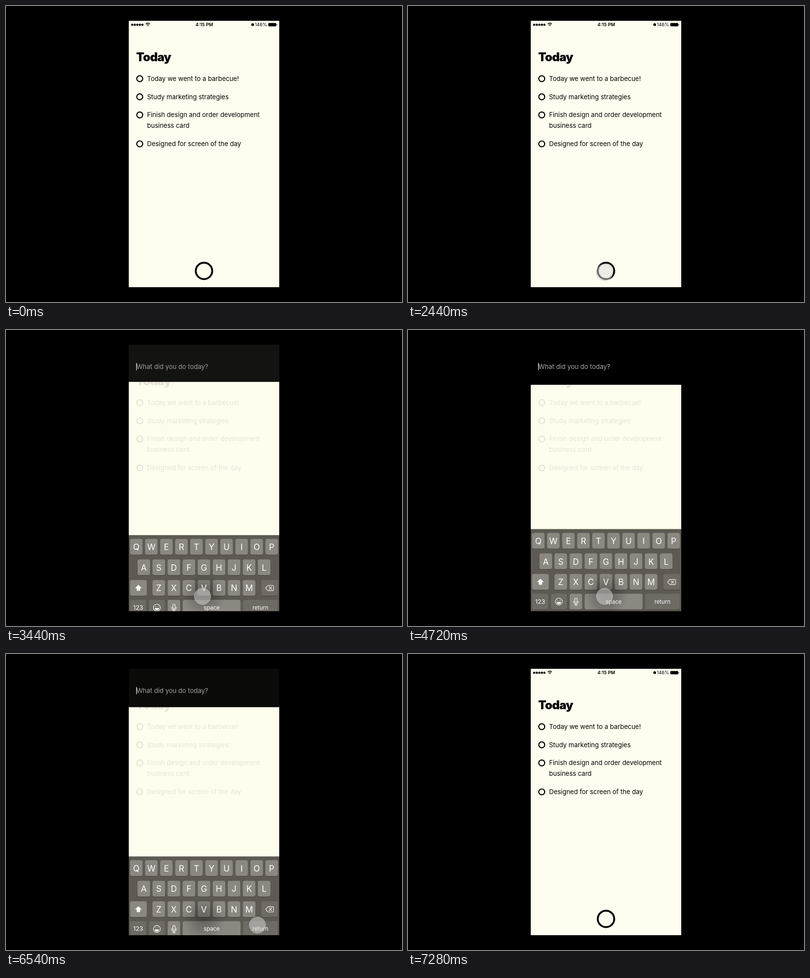
Animation of 800x600 px, one loop 8.54 s. Source, as an HTML page:

```html
<!DOCTYPE html>
<html lang="en">
<head>
<meta charset="utf-8">
<title>Daily journal</title>
<style>
  /* --open: 0 = list, 1 = entry screen; --press: button held down */
  @property --open { syntax: "<number>"; inherits: true; initial-value: 0; }
  @property --press { syntax: "<number>"; inherits: true; initial-value: 0; }

  html, body { margin: 0; width: 100%; height: 100%; overflow: hidden; background: #000; }
  svg { display: block; width: 100vw; height: 100vh; animation: open 8540ms infinite, press 8540ms infinite; }
  text { font-family: Inter, Roboto, sans-serif; font-size: 13px; }

  .title { font-size: 24px; font-weight: 900; letter-spacing: -.8px; }
  .status { font-size: 9.3px; }
  .bold { font-weight: 600; }
  .bullet { fill: none; stroke: #000; stroke-width: 2.2px; }

  .ring {
    --width: calc(3.8px * (1 - var(--open)));
    cx: 400px;
    cy: calc(1px * (537 - 257 * var(--open)));
    r: calc(1px * ((18.5 + 3.5 * var(--press)) * (1 - var(--open)) + 331 * var(--open)) - var(--width) / 2);
    fill: #fffdef;
    fill-opacity: .9;
    stroke: #000;
    stroke-width: var(--width);
  }
  .header { height: calc(1px * (2.5 + 78.5 * var(--open))); opacity: var(--open); }
  .prompt { fill: #a9a9a9; opacity: var(--open); }
  .caret { fill: #fff; opacity: var(--open); }

  .keyboard { transform: translateY(calc(166.5px * (1 - var(--open)))); }
  .key { fill: #8b8882; }
  .key.dark { fill: #6e6a64; }
  .edge { fill: #45423c; }
  .shade { cy: calc(1px * (537 - 166.5 * (1 - var(--open)))); opacity: var(--open); }
  .label { fill: #fff; text-anchor: middle; font-size: 17px; }
  .label.small { font-size: 11.3px; }
  .label.digits { font-size: 12.3px; }
  .line { fill: none; stroke: #fff; stroke-width: 1.1px; stroke-linecap: round; stroke-linejoin: round; }

  .touch {
    fill: rgba(218, 218, 218, .5);
    stroke: rgba(185, 185, 183, .7);
    stroke-width: 1px;
    animation: touch 8540ms infinite;
  }

  @keyframes open {
    0%, 37.471% { --open: 0; }
    41.686%, 76.347% { --open: 1; }
    80.562%, 100% { --open: 0; }
  }
  @keyframes press {
    0%, 28.571% { --press: 0; }
    32.787%, 50% { --press: 1; }
    50.01%, 100% { --press: 0; }
  }
  @keyframes touch {
    0%, 14.988% { transform: translate(570px, 523px); }
    19.672%, 55.269% { transform: translate(397px, 540px); }
    63.7%, 83.372% { transform: translate(508px, 549.5px); }
    87.588%, 100% { transform: translate(596px, 254px); }
  }
</style>
</head>
<body>
<svg viewBox="0 0 800 600">
  <defs>
    <clipPath id="screen"><rect x="248" y="30" width="304" height="540"/></clipPath>
    <radialGradient id="shadow">
      <stop offset="0" stop-opacity=".28"/>
      <stop offset=".4" stop-opacity=".2"/>
      <stop offset="1" stop-opacity="0"/>
    </radialGradient>
  </defs>
  <rect width="800" height="600"/>
  <g clip-path="url(#screen)">
    <rect x="248" y="30" width="304" height="540" fill="#fffdef"/>

    <g id="signal"></g>
    <g fill="none" stroke="#000" stroke-width="1.3">
      <path d="M282.3 36.2a6 6 0 0 1 8.4 0M283.9 38.2a3.7 3.7 0 0 1 5.2 0"/>
    </g>
    <path d="M285 39.5a2.1 2.1 0 0 1 3 0l-1.5 1.6z"/>
    <text class="status bold" x="400.5" y="41.2" text-anchor="middle">4:15 PM</text>
    <circle cx="498.3" cy="37.8" r="2.8"/>
    <text class="status" x="527.5" y="41.2" text-anchor="end">146%</text>
    <rect x="530" y="34.4" width="15.8" height="6.8" rx="1.3"/>
    <rect x="546.4" y="36.4" width="1.2" height="2.8" rx=".6"/>

    <text class="title" x="263" y="112.3">Today</text>
    <g id="list"></g>

    <circle class="ring"/>
    <rect class="header" x="248" y="30" width="304"/>
    <text class="prompt" x="263.5" y="78.6">What did you do today?</text>
    <rect class="caret" x="263" y="67" width="1.2" height="14.5"/>

    <g class="keyboard">
      <rect x="248" y="403.5" width="304" height="168" fill="#5e5a53"/>
      <g id="keys"></g>
      <circle class="shade" cx="400" r="44" fill="url(#shadow)"/>
      <g id="labels"></g>
      <path d="M267.5 504.3l7 6.8h-3.6v5.2h-6.8v-5.2h-3.6z" fill="#fff"/>
      <path class="line" d="M524.3 510.8l5-5.3h9.6q1.6 0 1.6 1.6v7.4q0 1.6-1.6 1.6h-9.6zM531.5 508l5.4 5.6M536.9 508l-5.4 5.6"/>
      <circle class="line" cx="304.8" cy="550.5" r="7"/>
      <path d="M300.3 551.3h9a4.5 4.5 0 0 1-9 0z" fill="#fff"/>
      <path class="line" d="M302.3 547.4v1M307.3 547.4v1" stroke-width="1.5"/>
      <rect class="line" x="337" y="543.5" width="4.6" height="9.6" rx="2.3"/>
      <path class="line" d="M334.7 549.3v1.7a4.6 4.6 0 0 0 9.2 0v-1.7M339.3 555.6v2.4M336.8 558h5"/>
    </g>
    <circle class="touch" r="16.5"/>
  </g>
</svg>
<script>
  const add = (id, tag, attrs, text = "") => {
    const node = document.createElementNS("http://www.w3.org/2000/svg", tag);
    for (const name in attrs) node.setAttribute(name, attrs[name]);
    node.textContent = text;
    document.getElementById(id).append(node);
  };

  for (let i = 0; i < 5; i++) add("signal", "circle", { cx: 255 + 5.15 * i, cy: 37.9, r: 2.25 });

  const item = (y, lines) => {
    add("list", "circle", { class: "bullet", cx: 270.2, cy: y, r: 6 });
    lines.forEach((line, i) => add("list", "text", { x: 285, y: y + 4.5 + 22 * i }, line));
  };
  item(147.3, ["Today we went to a barbecue!"]);
  item(184.1, ["Study marketing strategies"]);
  item(220.8, ["Finish design and order development", "business card"]);
  item(279.5, ["Designed for screen of the day"]);

  const key = (x, y, width, label = "", dark = false, style = "small") => {
    const box = { x, width, height: 32, rx: 4 };
    add("keys", "rect", { ...box, y: y + 1, class: "edge" });
    add("keys", "rect", { ...box, y, class: dark ? "key dark" : "key" });
    const drop = style ? 20 : 22.7;
    add("labels", "text", { class: "label " + style, x: x + width / 2, y: y + drop }, label);
  };
  const row = (letters, x, y) => [...letters].forEach((c, i) => key(x + 30.4 * i, y, 25.4, c, false, ""));
  row("QWERTYUIOP", 250.5, 411.2);
  row("ASDFGHJKL", 265.6, 452.8);
  row("ZXCVBNM", 296, 494.4);
  key(250.5, 494.4, 34);
  key(516, 494.4, 33.5, "", true);
  key(250.5, 534.6, 33, "123", true, "digits");
  key(288.5, 534.6, 33, "", true);
  key(326.5, 534.6, 25.4);
  key(357, 534.6, 116.8, "space");
  key(478.5, 534.6, 71, "return", true);
</script>
</body>
</html>
```
